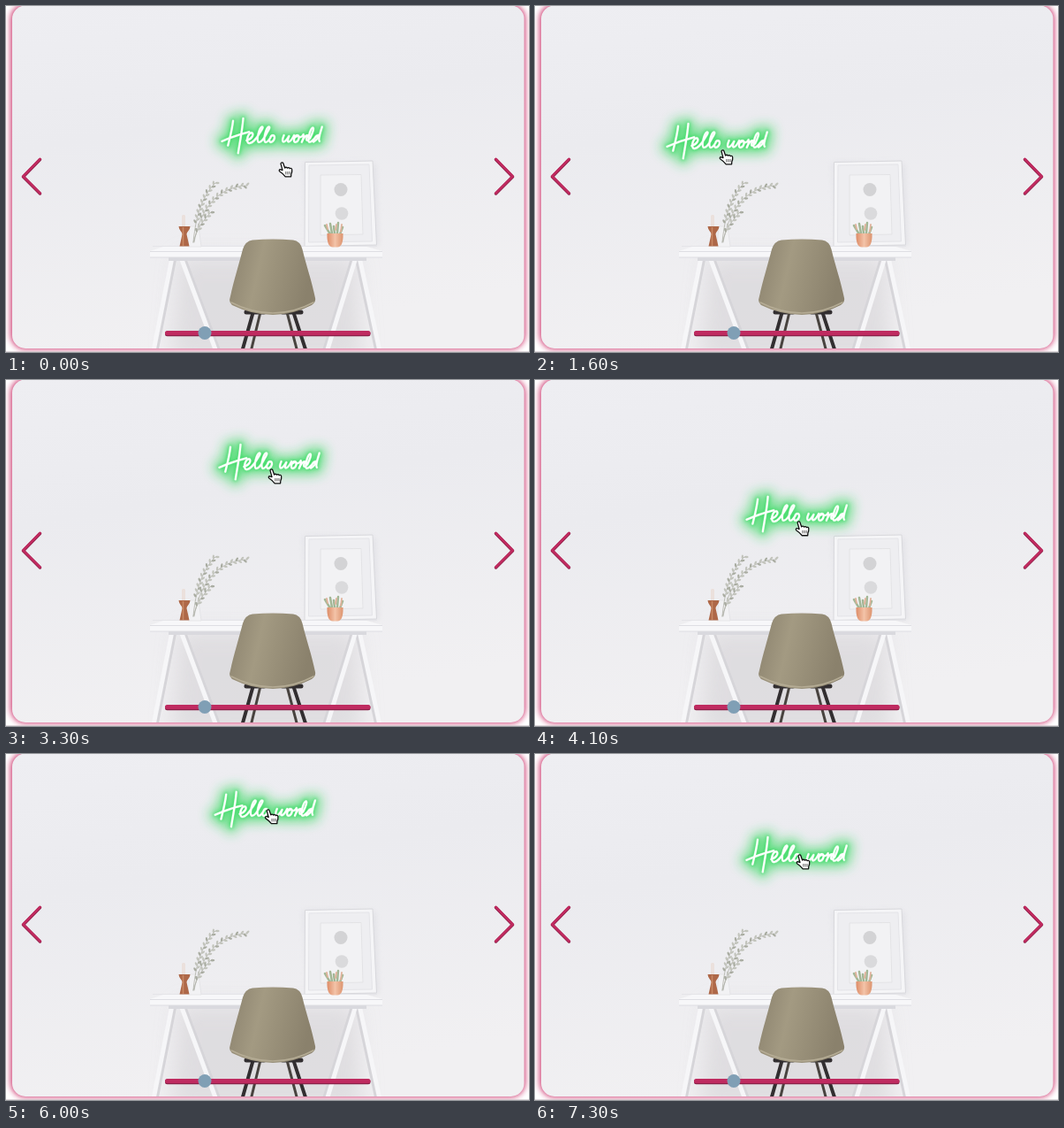
Write an HTML page that moves like this. It is 592 px wide and 391 px high and loops after 7.4 s.

```html
<!DOCTYPE html>
<html lang="en">
<head>
<meta charset="utf-8">
<title>Neon sign on a wall</title>
<style>
  html, body { margin: 0; width: 100%; height: 100%; overflow: hidden; background: #fff; }
  svg { display: block; width: 592px; height: 391px; }
  .line { fill: none; stroke-linecap: round; stroke-linejoin: round; }
</style>
</head>
<body>
<svg viewBox="0 0 592 391">
  <defs>
    <linearGradient id="wall" x1="0" y1="0" x2=".25" y2="1">
      <stop offset="0" stop-color="#eeeef2"/>
      <stop offset=".4" stop-color="#ebebef"/>
      <stop offset="1" stop-color="#f1f0f2"/>
    </linearGradient>
    <linearGradient id="shell" x1="0" y1="0" x2="1" y2=".2">
      <stop offset="0" stop-color="#8a816d"/>
      <stop offset=".4" stop-color="#a39a82"/>
      <stop offset="1" stop-color="#8a816c"/>
    </linearGradient>
    <linearGradient id="copper">
      <stop offset="0" stop-color="#dd8c67"/>
      <stop offset=".5" stop-color="#f3c3a8"/>
      <stop offset="1" stop-color="#dd946f"/>
    </linearGradient>
    <filter id="soft" x="-20%" y="-20%" width="140%" height="140%"><feGaussianBlur stdDeviation="3"/></filter>
    <filter id="shade" x="-30%" y="-30%" width="160%" height="160%"><feGaussianBlur stdDeviation="12"/></filter>
    <filter id="near" x="-30%" y="-60%" width="160%" height="220%"><feGaussianBlur stdDeviation="2.2"/></filter>
    <filter id="far" x="-40%" y="-90%" width="180%" height="280%"><feGaussianBlur stdDeviation="7"/></filter>
    <clipPath id="card"><rect x="7" y="-.5" width="579.5" height="387.500" rx="15"/></clipPath>
    <g id="words">
      <path d="M13 5C12 15 9 26 7 34M25 2C24 16 21 30 19 43M0 29C9 25 20 21 32 18"/>
      <path d="M29 28C36 26 38 20 35 19C31 19 28 28 31 31C35 33 41 25 44 20C48 14 49 12 47 12C44 13 40 28 43 30C46 31 50 25 53 19C56 14 57 12 55 12C52 13 48 28 51 30C53 31 55 28 57 25C58 21 62 21 62 25C61 30 56 32 56 28"/>
      <path d="M73 22C69 31 73 33 79 23C75 32 80 32 85 22C86 25 88 24 89 22C85 22 83 31 87 30C91 29 92 22 89 22C91 25 94 25 96 21C97 24 95 28 94 30C96 25 98 22 101 22C98 28 100 30 104 25C107 19 109 13 107 13C104 14 100 29 103 30C106 30 107 27 109 26C112 20 116 22 115 23C108 31 106 31 108 27C110 23 114 23 115 22L118 12C116 18 113 27 115 29"/>
    </g>
  </defs>

  <rect x="5" y="-2" width="583" height="390" rx="17" fill="#c8235f" opacity=".85" filter="url(#soft)"/>
  <path d="M0 390.500H592" stroke="#c9bfc5" opacity=".6"/>

  <g clip-path="url(#card)">
    <rect width="592" height="391" fill="url(#wall)"/>
    <path d="M196 284H396L404 400H186Z" fill="#d9d7da" opacity=".75" filter="url(#shade)"/>

    <!-- picture on the desk -->
    <path d="M337 177L342 272L422 271L418 178Z" fill="#dcdce1" filter="url(#soft)" opacity=".7"/>
    <path d="M338.500 176.500L415 175L419.500 270L338 271.500Z" fill="#f5f5f7" stroke="#d8d8dc"/>
    <path d="M343 180L411 179L414.500 266L342.500 267Z" fill="#eeeef1" stroke="#e4e4e8"/>
    <path d="M356 191L402 190.500L404 258L356 259Z" fill="#f2f2f4" stroke="#e0e0e3" stroke-width=".8"/>
    <circle cx="379" cy="207.500" r="7.500" fill="#d3d3d5"/>
    <circle cx="380" cy="234.500" r="7.300" fill="#dadadc"/>

    <!-- trestle desk -->
    <g class="line" stroke="#d6d5d9" stroke-width="7">
      <path d="M190 284L169 390M200 284L239 388M398 284L421 390M394 284L362 388"/>
      <path d="M188 284L167 390M198 284L237 388M400 284L423 390M396 284L364 388" stroke="#f6f6f8" stroke-width="5"/>
    </g>
    <path d="M184 283H408V288H184Z" fill="#d9d9de"/>
    <path d="M181 271H405L426 277V284H163V277Z" fill="#f7f7f9"/>
    <path d="M163 277.500H426M163 284H426" stroke="#dedee3"/>
    <path d="M166 271.500H420" stroke="#e4e4e8"/>

    <!-- branches, candle holder, plant -->
    <path d="M208 249H218L221 272H206Z" fill="#f2f2f4" stroke="#e0e0e3" stroke-width=".7"/>
    <g id="twigs" class="line" stroke="#b0b2a9" stroke-width=".8">
      <path d="M212 267C214 246 219 217 237 200"/>
      <path d="M213 267C218 238 234 204 273 203"/>
      <path d="M212 267C216 251 225 240 233 232"/>
    </g>
    <rect x="199" y="236" width="4" height="14" rx="1.500" fill="#ebe0dc"/>
    <path d="M195.500 249H208.500C208 254 204.500 255 204.500 258L207.500 271.500H196.500L199.500 258C199.500 255 196 254 195.500 249Z" fill="#ae6848"/>
    <path d="M200.500 250V271" stroke="#c98964" stroke-width="1.500"/>
    <g class="line" stroke="#a3b796" stroke-width="2.500">
      <path d="M367 258L361 248M369 257L367 246M372 257L371 249M375 257L376 245M378 258L381 250"/>
      <path d="M364 252L363 247M373 253L374 247M379 255L380 247" stroke="#e0b29a" stroke-width="1.800"/>
    </g>
    <path d="M363.500 257H381.500Q382 272.500 375 272.500H370Q363 272.500 363.500 257Z" fill="url(#copper)"/>

    <!-- chair -->
    <g class="line" stroke="#322e30" stroke-width="4">
      <path d="M272 346H292M313 346H334" stroke-width="5"/>
      <path d="M280 345L267 391M325 345L340 391"/>
      <path d="M288 346L277 391M318 346L330 391" stroke="#48433f" stroke-width="3"/>
    </g>
    <path d="M279 264.500Q302 262.500 325 264.500Q333 265.500 335.500 275C340 294 346 310 350 330Q351 335 346 338Q325 349 302 349Q278 349 256 338Q252 335 253.500 330C258 310 263 294 268 275Q271 265.500 279 264.500Z" fill="url(#shell)"/>
    <path class="line" d="M255 335Q278 347 302 347Q326 347 348 335" stroke="#b5ac95" stroke-width="1.600"/>
  </g>

  <!-- controls -->
  <g class="line" stroke="#861c44" stroke-width="3.400">
    <path d="M38.500 173.500L19.500 193L38.500 212M554.500 173.500L573.500 193L554.500 212"/>
    <path d="M38.500 173L19.500 192.500L38.500 211.500M554.500 173L573.500 192.500L554.500 211.500" stroke="#c02a5f" stroke-width="2.800"/>
  </g>
  <rect x="180" y="367.500" width="232.500" height="5.800" rx="2.500" fill="#8c2149"/>
  <rect x="180" y="367" width="232.500" height="5" rx="2.500" fill="#bf2b60"/>
  <circle cx="225" cy="369.500" r="7.500" fill="#809fb5"/>

  <g id="sign" class="line" role="img" aria-label="Hello world">
    <g transform="scale(.96)">
      <use href="#words" stroke="#22d84f" stroke-width="15" opacity=".62" filter="url(#far)"/>
      <use href="#words" stroke="#2cdb58" stroke-width="5" opacity=".65" filter="url(#near)"/>
      <use href="#words" stroke="#d9ffe2" stroke-width="3" opacity=".5"/>
      <use href="#words" stroke="#fff" stroke-width="2.100"/>
    </g>
  </g>

  <g id="hand">
    <path d="M3 2.200C3.400 .6 5.400 .6 5.900 2L7.600 7C8.400 5.900 10 6 10.500 7.200C11.400 6.200 12.800 6.600 13.200 7.700C14.200 7 15.600 7.500 15.700 9C15.900 11 15.600 12.500 14.800 14L14.600 16.800H8.200C6.600 14.800 4 12.400 1.800 11C.6 10 1.400 8.400 3 8.800L5 9.600Z" fill="#fff" stroke="#111" stroke-width="1.300" stroke-linejoin="round"/>
    <path d="M8.800 11V14.500M10.900 11V14.500M13 11V14.500" stroke="#333" stroke-width=".8"/>
  </g>
</svg>
<script>
const LOOP = 7400, STEP = 100;
const HOME = { x: 244.5, y: 125 };   // resting place of the sign
const HAND = { x: 8, y: 8 };         // middle of the pointer

// Each move eases to (x, y) between two times and then holds.
const drags = [
  { from: 400, to: 1600, x: -95, y: 6 },
  { from: 1600, to: 2100, x: 91, y: 30 },
  { from: 2100, to: 3100, x: -3, y: -54 },
  { from: 3500, to: 4200, x: -5, y: 8 },
  { from: 4300, to: 5400, x: -8, y: -90 },
  { from: 5900, to: 6500, x: -5, y: -2 },
  { from: 6600, to: 7300, x: -5, y: -33 },
];
// Pointer places, measured with the sign at rest.
const grips = [
  { from: 0, to: 100, x: 372, y: 262 },
  { from: 100, to: 300, x: 307, y: 162 },
  { from: 400, to: 1600, x: 311, y: 164 },
  { from: 1600, to: 2700, x: 307, y: 162 },
  { from: 4200, to: 4400, x: 308, y: 154 },
];

const byId = id => document.getElementById(id);
const sign = byId('sign'), hand = byId('hand');
const place = (node, x, y) => node.setAttribute('transform', `translate(${x} ${y})`);
const clamp = v => Math.min(1, Math.max(0, v));
const ease = f => (1 - Math.cos(Math.PI * f)) / 2;

function travel(start, moves, t) {
  return moves.reduce((p, m) => {
    const f = ease(clamp((t - m.from) / (m.to - m.from)));
    return { x: p.x + (m.x - p.x) * f, y: p.y + (m.y - p.y) * f };
  }, start);
}

function addLeaves(stem) {
  const length = stem.getTotalLength();
  for (let d = length * .3, n = 0; d < length; d += 3, n++) {
    const p = stem.getPointAtLength(d), q = stem.getPointAtLength(d - 1);
    const angle = Math.atan2(p.y - q.y, p.x - q.x) * 180 / Math.PI + (n % 2 ? 42 : -42);
    const leaf = document.createElementNS('http://www.w3.org/2000/svg', 'ellipse');
    const look = { cx: 2.3, cy: 0, rx: 2.4, ry: 1.2, fill: n % 3 ? '#c2c4bc' : '#a9aca1', stroke: 'none' };
    for (const key in look) leaf.setAttribute(key, look[key]);
    leaf.setAttribute('transform', `translate(${p.x} ${p.y}) rotate(${angle})`);
    byId('twigs').append(leaf);
  }
}
document.querySelectorAll('#twigs path').forEach(addLeaves);

function draw(ms) {
  const t = Math.floor((ms % LOOP) / STEP) * STEP;
  const drag = travel({ x: 0, y: 0 }, drags, t);
  const grip = travel({ x: 316, y: 184 }, grips, t);
  place(sign, HOME.x + drag.x, HOME.y + drag.y);
  place(hand, grip.x + drag.x - HAND.x, grip.y + drag.y - HAND.y);
}

const start = performance.now();
function tick() {
  draw(performance.now() - start);
  requestAnimationFrame(tick);
}
tick();
</script>
</body>
</html>
```
